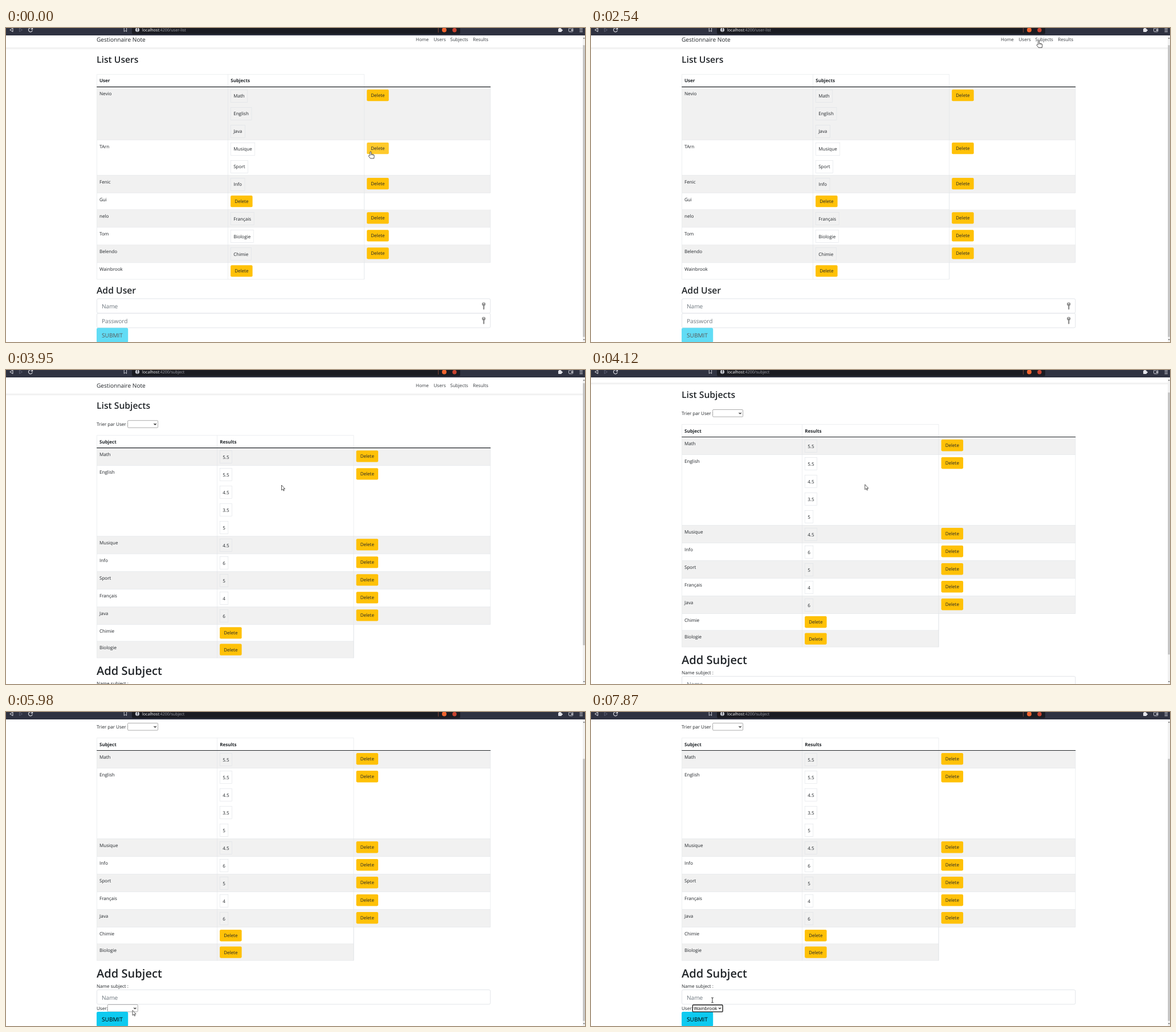
Write an HTML page that moves like this. It is 1016x551 px and loops after 8000 ms.

```html
<!DOCTYPE html>
<html lang="fr">
<head>
<meta charset="utf-8">
<title>Gestionnaire Note</title>
<style>
html, body { margin: 0; width: 100%; height: 100%; overflow: hidden; background: #fff; }
svg { display: block; width: 1016px; height: 551px; }
text { font-family: "Open Sans", "Noto Sans", sans-serif; white-space: pre; text-rendering: geometricPrecision; }
#popup { filter: drop-shadow(0 2px 2.5px rgba(0, 0, 0, .35)); }
</style>
</head>
<body>
<svg id="stage" viewBox="0 0 1016 551" xmlns="http://www.w3.org/2000/svg"></svg>
<script>
const LOOP = 8000, SIZE = 8.07, INK = '#212529', LINE = '#dee2e6';
const LEFT = 159.5, RIGHT = 850, USERS_SCROLL = 8.6, MAX_SCROLL = 70.5;
const PEOPLE = ['Nevio', 'TArn', 'Fenic', 'Gui', 'nelo', 'Tom', 'Belendo', 'Wainbrook'];

const pen = document.createElement('canvas').getContext('2d');
pen.font = '100px "Open Sans", "Noto Sans", sans-serif';
const widthOf = s => pen.measureText(s).width * SIZE / 100;

// markup helpers
const text = (x, y, s, size = SIZE, fill = INK, weight = 400, more = '') =>
  `<text x="${x}" y="${y}" font-size="${size}" fill="${fill}" font-weight="${weight}" ${more}>${s}</text>`;
const rect = (x, y, w, h, fill, more = '') =>
  `<rect x="${x}" y="${y}" width="${w}" height="${h}" fill="${fill}" ${more}/>`;
const path = (d, stroke, w = .55, fill = 'none', more = '') =>
  `<path d="${d}" stroke="${stroke}" stroke-width="${w}" fill="${fill}" ${more}/>`;
const group = (id, body, more = '') => `<g id="${id}" ${more}>${body}</g>`;
const circle = (x, y, r, fill) => `<circle cx="${x}" cy="${y}" r="${r}" fill="${fill}"/>`;

const navBar = () =>
  rect(-10, 43, 1040, 4, 'url(#fade)') +
  text(159, 32.4, 'Gestionnaire Note', 10.1) +
  [['Home', 719], ['Users', 750.5], ['Subjects', 779.5], ['Results', 819.3]]
    .map(([s, x]) => text(x, 31.5, s, SIZE, '#383c40')).join('');

const title = s => text(159, 69.6, s, 15.7, INK, 600);

const button = (x, y, id = '') =>
  rect(x, y, 38.5, 20.3, '#ffc107', `rx="2.1" ${id && `id="${id}"`}`) +
  text(x + 19.2, y + 13.2, 'Delete', SIZE, INK, 400, 'text-anchor="middle"');

const badge = (x, y, s) =>
  rect(x, y, widthOf(s) + 10, 22, 'none', `stroke="${LINE}" stroke-width=".6"`) + text(x + 5, y + 14, s);

const input = (y, label) =>
  rect(LEFT, y, RIGHT - LEFT, 25.4, '#fff', 'rx="2.5" stroke="#ced4da" stroke-width=".6"') +
  text(168, y + 17, label, 10.1, '#6c757d');

const key = y => `<g fill="#8c8c8c">${circle(838.3, y - 3, 3.1)}${rect(837.2, y - 1, 2.3, 7.5, '#8c8c8c', 'rx=".8"')}</g>` +
  circle(838.3, y - 4, .9, '#fff');

const submit = (y, more = '') => `<g ${more}>` + rect(159, y, 55.2, 25.6, '#0dcaf0', 'rx="2.5"') +
  text(168, y + 17, 'SUBMIT', 10.1, '#000') + '</g>';

const select = (x, y, w) =>
  rect(x, y, w, 12.6, '#fff', 'rx="1.3" stroke="#767676" stroke-width=".6"') +
  path(`M${x + w - 7} ${y + 5.4}l2 2 2-2`, '#222', 1.2);

// returns the markup and the bottom edge; rows without items hold the button in column two
function table(top, c1, c2, heads, rows, hover) {
  let y = top + 22, back = '', front = '';
  const head = text(164, top + 14, heads[0], SIZE, INK, 700) + text(c1 + 4.7, top + 14, heads[1], SIZE, INK, 700);
  front += path(`M${LEFT} ${y}V${top}H${c2}V${y}M${c1} ${top}V${y}`, LINE);
  rows.forEach(([name, ...items], i) => {
    const full = items.length > 0, h = full ? items.length * 31 : 29.3, end = full ? RIGHT : c2;
    if (i % 2 === 0) back += rect(LEFT, y, end - LEFT, h, '#f1f1f1');
    front += path(`M${LEFT} ${y}V${y + h}H${end}V${y}M${c1} ${y}v${h}M${c2} ${y}v${h}`, LINE);
    front += text(164, y + 14.2, name);
    items.forEach((s, k) => front += badge(c1 + 4.7, y + 5 + 31 * k, s));
    front += button((full ? c2 : c1) + 4.6, y + 4.6, hover === i ? 'hot' : '');
    y += h;
  });
  front += path(rows.length ? `M${LEFT - .3} ${top + 22}H${RIGHT + .3}` : `M${LEFT} ${y}H${c2}`,
    rows.length ? INK : LINE, rows.length ? 1.1 : .55);
  return [back + head + front, y];
}

function usersPage() {
  const items = [['Math', 'English', 'Java'], ['Musique', 'Sport'], ['Info'], [], ['Français'], ['Biologie'], ['Chimie'], []];
  const [body, b] = table(90, 389.5, 628.6, ['User', 'Subjects'], PEOPLE.map((p, i) => [p, ...items[i]]), 1);
  return navBar() + title('List Users') + body + text(159, b + 25.4, 'Add User', 15.7, INK, 600) +
    input(b + 34, 'Name') + key(b + 46.5) + input(b + 59.6, 'Password') + key(b + 72) +
    submit(b + 85.2, 'opacity=".65"');
}

function subjectsPage(rows, c1, c2, w) {
  const [body, b] = table(116, c1, c2, ['Subject', 'Results'], rows);
  return navBar() + title('List Subjects') + text(159, 99.7, 'Trier par User :') + select(213.6, 90, w) + body +
    text(159, b + 30, 'Add Subject', 20.1, INK, 600) + text(159, b + 48, 'Name subject :') +
    input(b + 51.4, 'Name') + text(159, b + 86.6, 'User:') + select(178.3, b + 77.3, w) + submit(b + 90);
}

const MARKS = [['Math', '5.5'], ['English', '5.5', '4.5', '3.5', '5'], ['Musique', '4.5'], ['Info', '6'],
  ['Sport', '5'], ['Français', '4'], ['Java', '6'], ['Chimie'], ['Biologie']];

const rowY = i => 407.2 + 11.7 * i;
const popup = () => rect(178.4, 407.4, 52.6, 106, '#fff', 'stroke="#6b6b6b" stroke-width=".8"') +
  rect(178.8, 0, 51.8, 11.7, '#1e90ff', 'id="mark"') +
  PEOPLE.map((p, i) => text(180.5, rowY(i + 1) + 8.7, p, SIZE, INK, 400, 'class="option"')).join('');

const chosen = () => rect(178.3, 514.2, 52.7, 12, '#fff', 'rx="1.3" stroke="#101010" stroke-width="1.2"') +
  path('M224 518.8l2 2 2-2', '#222', 1.2) + text(180.5, 522.9, PEOPLE[7], SIZE, '#000');

const browser = () => rect(0, 0, 1016, 13, '#2f3241') + rect(221, -6, 576, 16.8, '#1a1b22', 'rx="2"') +
  path('M12 .2L6.8 3.4 12 6.6Z', '#e4e4ea', 1) + path('M23.6 .4L28.6 3.4 23.6 6.4Z', '#62667a', .9) +
  path('M45.8 1.2A3.5 3.5 0 1 0 46.4 4.2M46.6 -.5V2.2H43.8', '#e4e4ea', 1.1) +
  path('M207.2 -1V6.3L209.4 4.6 211.6 6.3V-1', '#d6d7de', .9) +
  circle(230.5, 3.2, 3.6, '#c3c5ce') + rect(230, -.2, 1.1, 3.8, '#1a1b22') + rect(230, 4.5, 1.1, 1.1, '#1a1b22') +
  text(239, 5.8, 'localhost<tspan id="route" fill="#a0a2ab"></tspan>', 7.1, '#fff') +
  rect(758.2, 0, .9, 8, '#8d4b3c') + circle(769, 3.4, 4, '#f0642f') + circle(787, 3.8, 3.7, '#c8432f') +
  rect(969, 1, 6, 6, '#e4e4ea', 'rx="1"') + circle(972, .6, 1.4, '#e4e4ea') + circle(975.4, 4, 1.4, '#e4e4ea') +
  rect(987.6, .2, 7.2, 6.4, 'none', 'rx="1.2" stroke="#e4e4ea" stroke-width=".9"') + rect(991.4, 2.6, 3.4, 2, '#e4e4ea') +
  [1, 3.6, 6.2].map(y => rect(1006.5, y, 5.4, .9, '#e4e4ea')).join('');

const scrollbar = () => rect(1012, 13, 4, 538, '#f1f1f1') + rect(1012.4, 0, 3.3, 10, '#c1c1c1', 'id="thumb"') +
  path('M1012.8 18.8l1.4-2 1.4 2Z', 'none', 0, '#505050') + path('M1012.8 546l1.4 2 1.4-2Z', 'none', 0, '#505050');

const cursors = () =>
  group('arrow', path('M0 0V8.9L2.1 7.1 3.5 10.1 4.8 9.5 3.4 6.6H6.1Z', '#222', .75, '#fff')) +
  group('hand', path('M-1.2 6.7V1A1.1 1.1 0 0 1 1 1V4.4L4.8 5.2Q6.3 5.7 6.2 7.3L5.6 11.9H-.6L-3.7 7.8Q-3.8 6.4-2.4 6.4Z', '#222', .8, '#fff') +
    path('M1 4.4V6.4M2.8 4.9V6.6M4.6 5.3V6.9', '#222', .6)) +
  group('beam', path('M-1.9-4.4Q0-4.6 0-3.4Q0-4.6 1.9-4.4M0-3.6V3.6M-1.9 4.4Q0 4.6 0 3.4Q0 4.6 1.9 4.4', '#222', .9));

document.getElementById('stage').innerHTML =
  `<defs><linearGradient id="fade" x2="0" y2="1"><stop stop-opacity=".085"/><stop offset="1" stop-opacity="0"/></linearGradient></defs>` +
  rect(0, 0, 1016, 551, '#fff') +
  group('users', usersPage()) +
  group('empty', subjectsPage([], 511, 850, 12.4), 'transform="translate(4.5 0)"') +
  group('full', subjectsPage(MARKS, 370.5, 610, 53)) +
  group('chosen', chosen()) + group('popup', popup()) + group('bar', scrollbar()) + browser() +
  group('status', rect(-2, 541, 68.8, 12, '#2b2c33', 'rx="1.5"') + text(0, 548.8, 'localhost:4200/subject', 6.1, '#f2f2f2')) +
  group('cursor', cursors());

const $ = id => document.getElementById(id);
const show = (id, on) => $(id).setAttribute('display', on ? 'inline' : 'none');
const move = (id, x, y) => $(id).setAttribute('transform', `translate(${x} ${y})`);
const clamp = u => Math.min(1, Math.max(0, u));
const smooth = u => u * u * (3 - 2 * u);

// time, x, y, and whether the way there is linear
const TRACK = [[0, 640, 217], [1160, 640, 217], [1990, 764.8, 27.5], [2040, 764.8, 27.5], [2500, 785.8, 22.5],
  [2560, 785.8, 22.5], [2780, 788, 21], [3100, 788, 21], [3860, 483.5, 202], [3950, 483.5, 202], [4510, 471, 197],
  [4780, 471, 197], [5060, 452.5, 219, 1], [5590, 248.5, 478.5], [5640, 248.5, 478.5], [5990, 222, 523.5],
  [6590, 241, 489], [6680, 238, 489], [6760, 238, 489], [6800, 213, 505.7], [LOOP, 213, 505.7]];

function pointer(t) {
  const i = Math.max(1, TRACK.findIndex(k => k[0] > t));
  const [a, x, y] = TRACK[i - 1], [b, x2, y2, linear] = TRACK[i];
  const u = (t - a) / (b - a), s = linear ? u : smooth(u);
  return [x + (x2 - x) * s, y + (y2 - y) * s];
}

function highlight(t) {
  if (t < 6220) return 0;
  return t >= 6760 && t < 6880 ? 7 : 8;
}

function draw(t) {
  const users = t < 3090, full = t >= 3160, open = t >= 6100 && t < 7080;
  const scroll = users ? USERS_SCROLL : full ? MAX_SCROLL * smooth(clamp((t - 3900) / 620)) : 0;
  const range = users ? USERS_SCROLL : MAX_SCROLL;
  show('users', users);
  show('empty', !users && !full);
  show('full', full);
  move('users', 0, -scroll);
  move('full', 0, -scroll);
  $('route').textContent = users ? ':4200/user-list' : ':4200/subject';

  show('bar', users || full);
  const long = 520 * 538 / (538 + range);
  $('thumb').setAttribute('y', 22 + (520 - long) * scroll / range);
  $('thumb').setAttribute('height', long);
  show('status', t >= 2620 && t < 3240);

  show('popup', open);
  show('chosen', t >= 7080);
  const row = highlight(t);
  $('mark').setAttribute('y', rowY(row));
  document.querySelectorAll('.option').forEach((o, i) => o.setAttribute('fill', i + 1 === row ? '#fff' : INK));

  const [x, y] = pointer(t);
  const onButton = users && t < 1900 && y > 201.5;
  const onLink = t > 1500 && t < 3900 && y < 36;
  const inField = t > 5060 && y > 488 && y < 514;
  $('hot').setAttribute('fill', onButton ? '#ffca2c' : '#ffc107');
  show('hand', onButton || onLink);
  show('beam', inField);
  show('arrow', !onButton && !onLink && !inField);
  show('cursor', t < 6100 || (t >= 6600 && t < 6760) || t >= 7640);
  move('cursor', x, y);
}

function tick(now) {
  draw(now % LOOP);
  requestAnimationFrame(tick);
}
draw(0);
requestAnimationFrame(tick);
</script>
</body>
</html>
```
